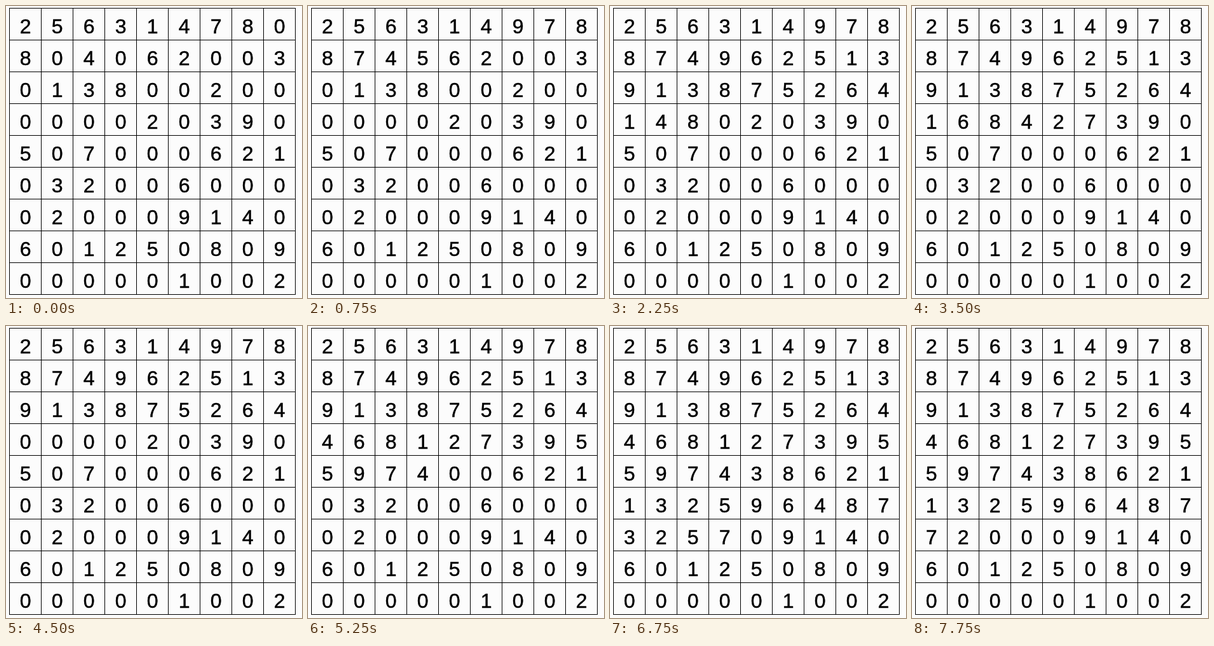
An HTML page that plays this animation: 466x459 px, repeating every 8 s.

```html
<!DOCTYPE html>
<html lang="en">
<head>
<meta charset="utf-8">
<title>Backtracking number grid</title>
<style>
  html, body { margin: 0; width: 100%; height: 100%; overflow: hidden; background: #fcfcfc; }
  svg { display: block; width: 466px; height: 459px; }
  path { stroke: #000; fill: none; shape-rendering: crispEdges; }
  text {
    font: 32px "Liberation Sans", Arial, sans-serif;
    text-anchor: middle;
    fill: #000;
    stroke: #000;
    stroke-width: 0.5px;
  }
</style>
</head>
<body>
<svg viewBox="0 0 466 459"><path id="grid"/><g id="digits"></g></svg>
<script>
const LOOP = 8000, STEP = 250, CELL = 50, LEFT = 5, TOP = 3;

const PUZZLE =
  '256314000' + '804062003' + '013800200' +
  '000020390' + '507000621' + '032006000' +
  '020009140' + '601250809' + '000001002';

// Number of solver moves completed at each step; null is an empty board.
const MOVES = [
  1, 3, 5, 8, 11, 13, 15, 18, 21, 24, 27, 30, 33, 35, 38, 41,
  44, 47, 51, 54, 56, 59, 62, 64, 67, 69, 72, 74, 76, 79, null, 86
];

function fits(board, cell, digit) {
  const row = Math.floor(cell / 9), col = cell % 9;
  const boxRow = row - row % 3, boxCol = col - col % 3;
  for (let i = 0; i < 9; i++) {
    const boxCell = (boxRow + Math.floor(i / 3)) * 9 + boxCol + i % 3;
    if (board[row * 9 + i] === digit || board[i * 9 + col] === digit || board[boxCell] === digit) return false;
  }
  return true;
}

// Yields the board after every placement and every removal.
function* solve(board) {
  const cell = board.indexOf(0);
  if (cell < 0) return true;
  for (let digit = 1; digit <= 9; digit++) {
    if (!fits(board, cell, digit)) continue;
    board[cell] = digit;
    yield board.slice();
    if (yield* solve(board)) return true;
    board[cell] = 0;
    yield board.slice();
  }
  return false;
}

function recordStates(count) {
  const states = [];
  for (const state of solve([...PUZZLE].map(Number))) {
    states.push(state);
    if (states.length > count) break;
  }
  return states;
}

function drawGrid() {
  let d = '';
  for (let i = 0; i <= 9; i++) {
    const x = LEFT + i * CELL + 0.5, y = TOP + i * CELL + 0.5;
    d += `M${x} ${TOP}v${9 * CELL + 1}M${LEFT} ${y}h${9 * CELL + 1}`;
  }
  document.getElementById('grid').setAttribute('d', d);
}

function makeDigit(cell) {
  const text = document.createElementNS('http://www.w3.org/2000/svg', 'text');
  text.setAttribute('x', LEFT + (cell % 9) * CELL + 25.7);
  text.setAttribute('y', TOP + Math.floor(cell / 9) * CELL + 40);
  return digits.appendChild(text);
}

const digits = document.getElementById('digits');
const states = recordStates(Math.max(...MOVES));
const labels = Array.from(PUZZLE, (_, cell) => makeDigit(cell));
let shown = -1;

function render(time) {
  const step = Math.floor((time % LOOP) / STEP);
  if (step === shown) return;
  shown = step;
  const board = states[MOVES[step]];
  labels.forEach((label, cell) => { label.textContent = board ? board[cell] : ''; });
}

drawGrid();
render(0);
const start = performance.now();
(function tick() {
  render(performance.now() - start);
  requestAnimationFrame(tick);
})();
</script>
</body>
</html>
```
